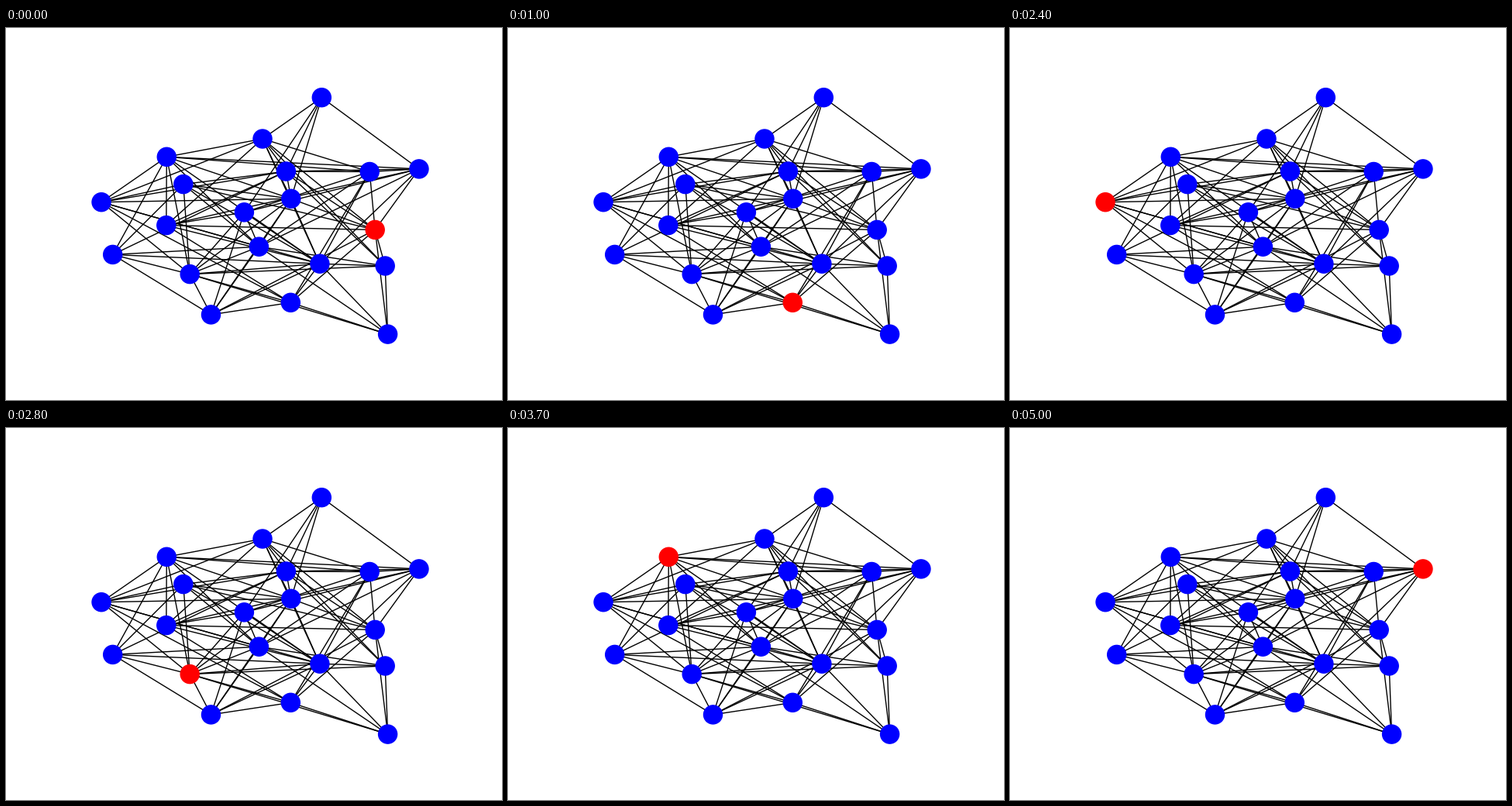
These frames come from a looping animation (640 by 480 pixels, 5.1 s). A matplotlib script:

```python
import matplotlib.pyplot as plt
from matplotlib.animation import FuncAnimation
from matplotlib.collections import LineCollection

WIDTH, HEIGHT, DPI = 640, 480, 100
STEP_MS = 100

# Node positions in pixels, measured from the top left corner.
NODES = {
    "T": (407.3, 89.7), "A": (331.0, 143.0), "B": (207.3, 166.3),
    "C": (228.8, 201.6), "D": (123.05, 224.7), "E": (206.8, 254.6),
    "F": (137.7, 292.4), "G": (237.2, 317.6), "H": (264.5, 369.9),
    "I": (367.3, 354.3), "J": (326.4, 282.2), "K": (307.4, 237.8),
    "L": (361.4, 185.0), "M": (367.8, 220.3), "N": (469.2, 185.5),
    "O": (532.95, 181.9), "P": (476.2, 260.4), "Q": (489.2, 307.0),
    "R": (404.9, 304.2), "S": (492.6, 395.1),
}

# Each undirected edge is listed once.
NEIGHBOURS = {
    "T": "AKLMO", "A": "BDELMNPQR", "B": "DEFGJRMNO", "C": "DFGJRLMP",
    "D": "LMRIGJ", "E": "LOPRIK", "F": "JRHGL", "G": "RQJKMSIH",
    "H": "JMKIRP", "I": "SRNP", "J": "ONSMKQ", "K": "ONR",
    "L": "NOMPQ", "M": "PR", "N": "OPR", "O": "PR",
    "P": "QS", "Q": "SR", "R": "S",
}

# The walker's node at every step; it rests on the first one.
WALK = "PPLAMJGRONIDCMRSQPIHJOBADEJKGHRNPALCJBDGFHMLQROKJNO"

fig = plt.figure(figsize=(WIDTH / DPI, HEIGHT / DPI), dpi=DPI, facecolor="white")
ax = fig.add_axes([0, 0, 1, 1])
ax.set(xlim=(0, WIDTH), ylim=(HEIGHT, 0))
ax.axis("off")

edges = [(NODES[a], NODES[b]) for a, ends in NEIGHBOURS.items() for b in ends]
ax.add_collection(LineCollection(edges, colors="black", linewidths=1, zorder=1))
dots = ax.scatter(*zip(*NODES.values()), s=300, linewidths=1, zorder=2)


def update(step):
    colors = ["red" if name == WALK[step] else "blue" for name in NODES]
    dots.set_facecolor(colors)
    dots.set_edgecolor(colors)
    return [dots]


anim = FuncAnimation(fig, update, frames=len(WALK), interval=STEP_MS,
                     repeat=True, repeat_delay=0)
plt.show()
```
